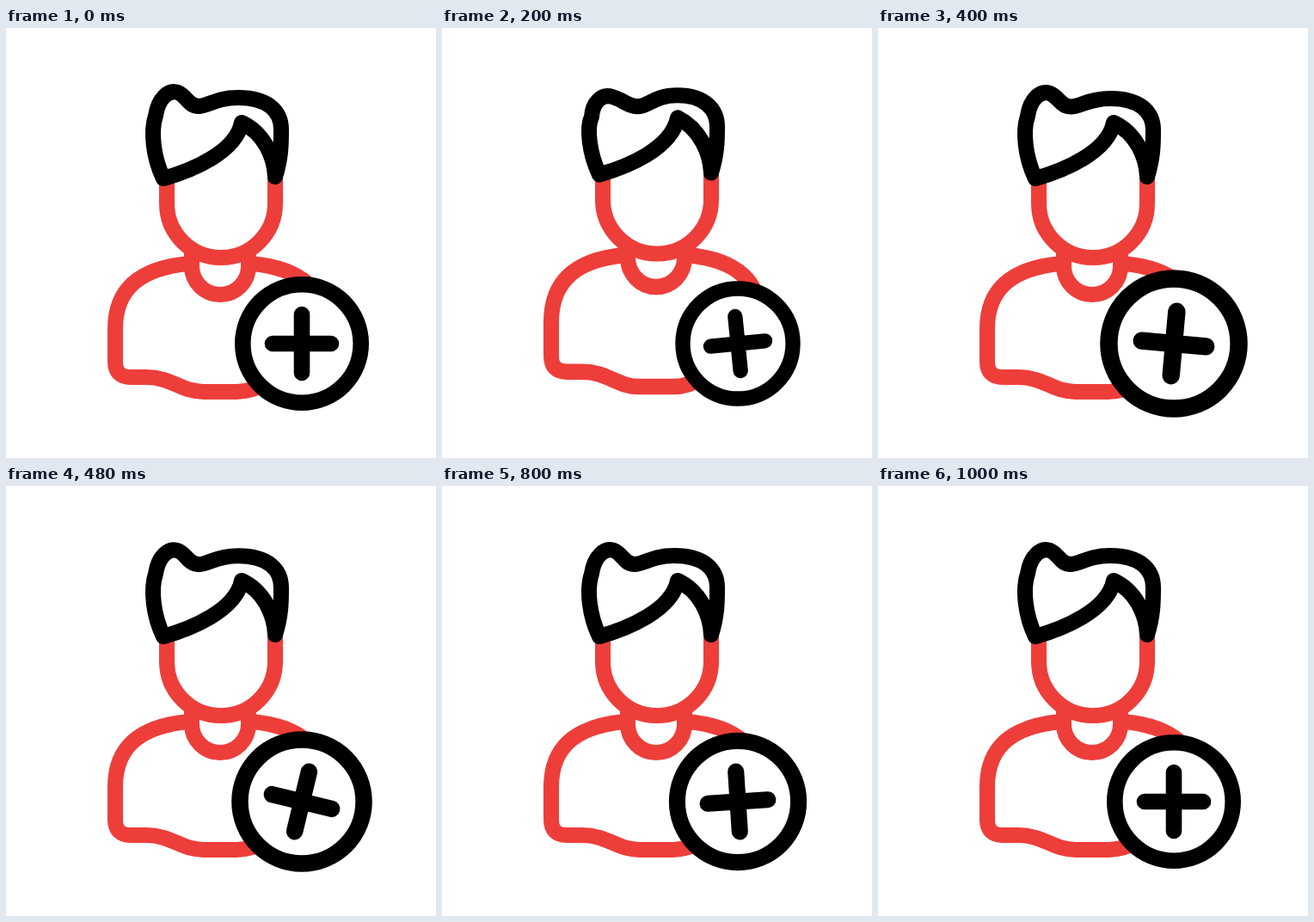
Recreate the animation shown at these times as an HTML page. Size 500 by 500 pixels, loop 1.04 s.

```html
<!DOCTYPE html>
<html lang="en">
<head>
<meta charset="utf-8">
<title>Add user</title>
<style>
  html, body { margin: 0; width: 100%; height: 100%; overflow: hidden; background: #fff; }
  svg { display: block; width: 100%; height: 100%; }
  path, circle { fill: none; stroke-width: 18; stroke-linecap: round; stroke-linejoin: round; }
  .red { stroke: #ee3e3a; }
  .black { stroke: #000; }
  .solid { fill: #fff; }
</style>
</head>
<body>
<svg viewBox="0 0 500 500">
  <g id="torso" class="red">
    <path d="M212 274C160 279 127 300 127 350V388Q127 406 145 406H163C193 406 203 423 230 423H268C295 423 305 406 335 406H353Q371 406 371 388V350C371 300 338 279 286 274"/>
    <path d="M216 259V277A33 33 0 0 0 282 277V259" style="stroke-linecap:butt"/>
  </g>
  <g id="head">
    <path class="red solid" d="M187 172V204A63 63 0 0 0 313 204V172"/>
    <path id="hair" class="black solid"/>
  </g>
  <g id="badge" class="black">
    <circle class="solid" r="68.7" style="stroke-width:18.6"/>
    <path id="plus" d="M-34 0H34M0-34V34" style="stroke-width:18.6"/>
  </g>
</svg>
<script>
const LOOP = 1040, STEP = 40;
const el = id => document.getElementById(id);
const set = (id, name, value) => el(id).setAttribute(name, value);

// Each track is a list of [time, value] turning points.
const tracks = {
  scale: [[0, 1], [160, .92], [400, 1.1], [595, .958], [785, 1.028], [1000, 1]],
  angle: [[0, 0], [175, -8], [450, 104], [760, 86], [1000, 90]],
  torso: [[0, 0], [190, 1], [370, 0]],
  head: [[100, 0], [285, -8], [400, 0]],
  quiff: [[40, 0], [190, 10], [290, -9], [400, 1], [520, 0]],
  crown: [[40, 0], [190, 2], [290, -7], [400, 1], [520, 0]]
};

// Sine easing between neighbouring turning points.
function at(track, t) {
  const i = track.findIndex(([time]) => time > t);
  if (i < 0) return track[track.length - 1][1];
  if (i === 0) return track[0][1];
  const [t0, a] = track[i - 1], [t1, b] = track[i];
  return a + (b - a) * (1 - Math.cos(Math.PI * (t - t0) / (t1 - t0))) / 2;
}

function hairPath(q, c) {
  const x = q * .4, dip = 91 + q * .5, tip = 110 + (c - q) * .15;
  return `M183 175C171 150 168 120 174 ${102 + q * .6}
    C${177 - x / 2} ${82 + q} ${189 - x} ${71 + q} ${200 - x / 2} ${75 + q}
    C${210 + x / 2} ${79 + q} ${212 + x} ${dip} ${224 + x} ${dip}
    C${236 + x} ${dip} ${243 + x} ${81 + c} ${270 + x} ${81 + c}
    C305 ${81 + c} 320 ${97 + c} 320 ${118 + c * .7}
    C320 135 320 150 313 173C312 150 300 122 274 ${tip}
    C267 145 215 166 183 175Z`;
}

function draw(now) {
  const t = Math.floor(now % LOOP / STEP) * STEP;
  const v = {};
  for (const name in tracks) v[name] = at(tracks[name], t);
  set('torso', 'transform', `translate(0 ${-17.6 * v.torso}) scale(1 ${1 + .0276 * v.torso})`);
  set('head', 'transform', `translate(0 ${v.head})`);
  set('hair', 'd', hairPath(v.quiff, v.crown));
  set('badge', 'transform', `translate(344 367) scale(${v.scale})`);
  set('plus', 'transform', `rotate(${v.angle})`);
}

const start = performance.now();
function tick() {
  draw(performance.now() - start);
  requestAnimationFrame(tick);
}
tick();
</script>
</body>
</html>
```
